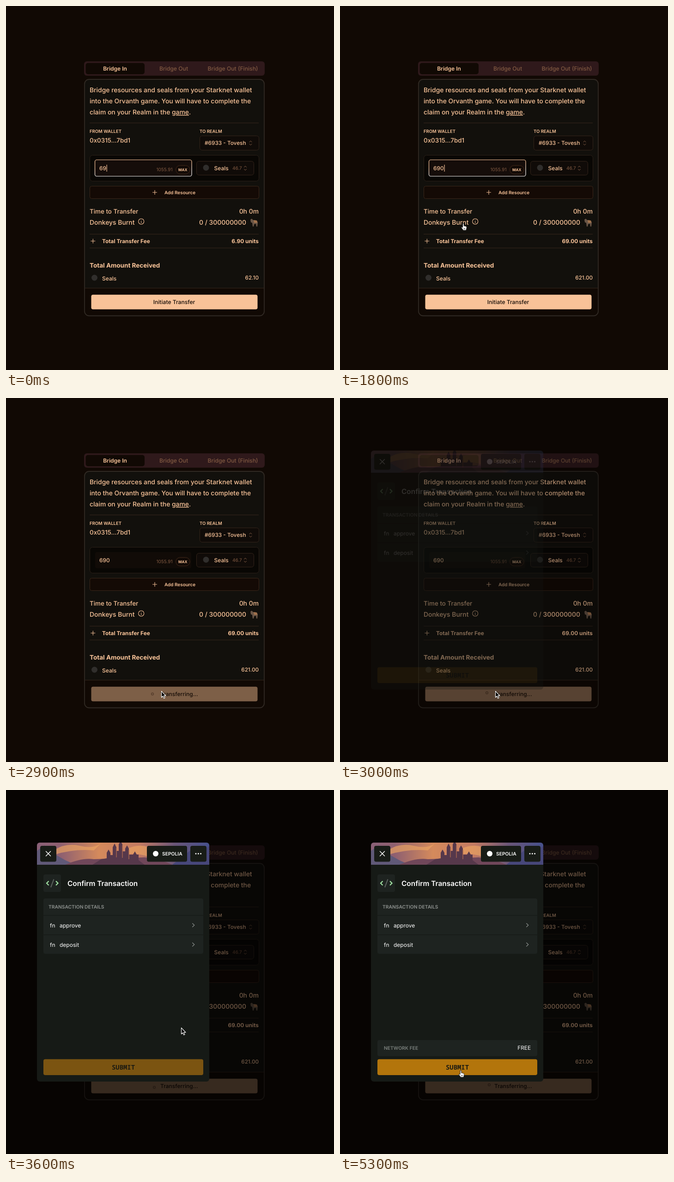
An HTML page for the animation above (5400 ms loop, 710 px wide and 789 px high).

```html
<!DOCTYPE html>
<html lang="en">
<head>
<meta charset="utf-8">
<title>Bridge transfer</title>
<style>
  html, body { margin: 0; width: 100%; height: 100%; overflow: hidden; background: #110904; }
  svg { display: block; width: 710px; height: 789px; font-family: Inter, sans-serif; text-rendering: geometricPrecision; }
  text { white-space: pre; }
  .peach { fill: #fbc59a; }
  .mute { fill: #825a42; }
  .line { stroke: #35251b; fill: none; }
  .box { stroke: #33241a; fill: #100b08; }
  .ico { fill: none; stroke: #f8c298; stroke-width: 1.1; stroke-linecap: round; }
  .arrows { fill: none; stroke: #8a6249; stroke-linecap: round; stroke-linejoin: round; }
  .m { font-weight: 500; }
  .s { font-weight: 600; }
  .b { font-weight: 700; }
  .end { text-anchor: end; }
  .mid { text-anchor: middle; }
  .tile { fill: #181c17; }
  .row { fill: #1e2320; }
</style>
</head>
<body>
<svg viewBox="0 0 710 789">
  <defs>
    <linearGradient id="ring" x1="0" y1="0" x2=".3" y2="1">
      <stop offset=".4" stop-color="#f8c298"/><stop offset=".9" stop-color="#f3f1ef"/>
    </linearGradient>
    <linearGradient id="sky">
      <stop offset="0" stop-color="#8a6077"/><stop offset=".14" stop-color="#8f6070"/>
      <stop offset=".36" stop-color="#d58a5c"/><stop offset=".6" stop-color="#c27a63"/>
      <stop offset=".8" stop-color="#695578"/><stop offset="1" stop-color="#46508c"/>
    </linearGradient>
    <clipPath id="banner"><path d="M67 162V120a6 6 0 0 1 6-6H434a6 6 0 0 1 6 6V162Z"/></clipPath>
    <path id="updown" class="arrows" d="M-2.6-2 0-4.6 2.6-2M-2.6 2 0 4.6 2.6 2"/>
    <path id="plus" class="ico" d="M-4.5 0H4.5M0-4.5V4.5"/>
    <path id="next" d="M-2-3.8 2 0-2 3.8" fill="none" stroke="#8d918e" stroke-width="1.2" stroke-linecap="round"/>
    <circle id="token" r="6.500" fill="#302e2c"/>
  </defs>

  <rect width="710" height="789" fill="#110904"/>

  <g class="m mid" font-size="12.2">
    <rect x="169" y="120" width="391" height="31" rx="6" fill="#2f191b"/>
    <rect x="172.500" y="123.500" width="127.500" height="24.500" rx="5" fill="#110904"/>
    <text class="peach s" x="236" y="140" font-size="12">Bridge In</text>
    <text class="mute" x="363" y="140">Bridge Out</text>
    <text class="mute" x="491" y="140">Bridge Out (Finish)</text>
  </g>

  <rect x="170" y="159" width="389" height="512.500" rx="10" fill="#12100c"/>
  <path d="M170 611.500H559V661.500a10 10 0 0 1-10 10H180a10 10 0 0 1-10-10Z" fill="#110904"/>
  <rect x="170" y="159" width="389" height="512.500" rx="10" fill="none" stroke="#312a24" stroke-width="1.8"/>
  <path class="line" d="M181 253.500H547M181 494.500H547M181 524.500H547M171 611.500H558"/>

  <g class="peach m" font-size="13.9">
    <text x="181" y="186.500">Bridge resources and seals from your Starknet wallet</text>
    <text x="181" y="210.700">into the Orvanth game. You will have to complete the</text>
    <text x="181" y="235">claim on your Realm in the <tspan text-decoration="underline">game</tspan>.</text>
    <text x="181" y="296" font-size="13.4">0x0315...7bd1</text>
    <text x="181" y="450" font-size="13.4">Time to Transfer</text>
    <text x="181" y="474">Donkeys Burnt</text>
    <text class="end" x="547" y="450">0h 0m</text>
    <text class="end" x="520" y="474">0 / 300000000</text>
  </g>
  <g class="peach s" font-size="9.5">
    <text x="181" y="274.500">FROM WALLET</text>
    <text x="419" y="274.500">TO REALM</text>
  </g>

  <rect class="box" x="419.500" y="281.500" width="128" height="31" rx="5"/>
  <text class="peach m" x="430" y="301" font-size="11.8">#6933 - Tovesh</text>
  <use href="#updown" x="529.500" y="297"/>

  <rect x="181.500" y="323.500" width="366" height="56" rx="6" fill="#090704" stroke="#2b2018"/>
  <rect x="193" y="334" width="208" height="35" rx="4" fill="#110b07"/>
  <g id="focus">
    <rect x="192.500" y="333.500" width="209.500" height="35.500" rx="4" fill="#150d0a" stroke="url(#ring)" stroke-width="1.2"/>
  </g>
  <rect id="caret" x="217.500" y="344" width="1.200" height="15" fill="#f8c298"/>
  <text class="mute" x="360.500" y="358.300" font-size="10" text-anchor="end">1055.91</text>
  <rect x="367.500" y="345.500" width="30.500" height="18.500" rx="9.250" fill="#120a06" stroke="#43291a"/>
  <text class="peach b mid" x="382.700" y="357.500" font-size="8.1">MAX</text>
  <rect class="box" x="412.500" y="336.500" width="124" height="30" rx="5"/>
  <use href="#token" x="433" y="350.500"/>
  <text class="peach m" x="450.500" y="355.700" font-size="12">Seals</text>
  <text class="mute" x="490" y="355" font-size="10">46.7</text>
  <use href="#updown" x="518" y="351.500"/>

  <rect x="181.500" y="390.500" width="366" height="27" rx="4" fill="#140a05" stroke="#3b271a"/>
  <use href="#plus" x="322" y="404"/>
  <text class="peach s" x="343" y="407.700" font-size="9.95">Add Resource</text>

  <g class="ico"><circle cx="292.700" cy="467" r="6"/><path d="M292.700 466.500V470M292.700 464V464.100"/></g>
  <path d="M529 463 532 461 535 464 543 465 545 469 544 478H542L541 472 537 473 536 478H534L533 470 530 469Z" fill="#6a5647"/>
  <path d="M536 464 543 465 544 470 537 470Z" fill="#a0714c"/>

  <use href="#plus" x="188.300" y="509.500"/>
  <text class="peach b" x="208" y="514" font-size="11.8">Total Transfer Fee</text>
  <text class="peach b" x="181" y="567" font-size="13.5">Total Amount Received</text>
  <use href="#token" x="191.500" y="589"/>
  <text class="peach m" x="208" y="595" font-size="12">Seals</text>

  <g id="before" class="peach m" font-size="11.9">
    <text x="202" y="356">69</text>
    <text class="end b" x="547" y="514">6.90 units</text>
    <text class="end" x="547" y="593" font-size="11.7">62.10</text>
  </g>
  <g id="after" class="peach m" font-size="11.9">
    <text x="202" y="356">690</text>
    <text class="end b" x="547" y="514">69.00 units</text>
    <text class="end" x="547" y="593" font-size="11.7">621.00</text>
  </g>

  <rect id="button" x="184.500" y="625.700" width="360" height="31.700" rx="4" fill="#f8c298"/>
  <text id="idle" class="m mid" x="364" y="646" font-size="12.1" fill="#150c06">Initiate Transfer</text>
  <g id="busy">
    <text class="m" x="334" y="646" font-size="12" fill="#150c06">Transferring...</text>
    <circle id="spinner" r="2.400" fill="none" stroke="#4f3828" stroke-width="1.300"/>
  </g>

  <rect id="shade" width="710" height="789" fill="#000"/>

  <rect id="panel" x="67" y="114" width="373" height="518" rx="6" fill="#161a16"/>
  <g id="modal">
    <g clip-path="url(#banner)">
      <rect x="67" y="114" width="373" height="48" fill="url(#sky)"/>
      <path d="M105 130Q130 114 160 121T205 116L190 131Q150 127 105 140ZM262 128Q285 116 310 124V145Q280 135 262 140Z" fill="#eda562" opacity=".65"/>
      <path d="M67 132 83 120 100 136 128 152 150 162H67Z" fill="#605978"/>
      <path d="M360 162 390 138 408 124 425 133 440 121V162Z" fill="#47477a"/>
      <path d="M128 162Q165 146 190 150L300 146Q335 150 360 162Z" fill="#70475a"/>
      <path d="M187 162 206 150 218 148V136L222 129 226 136V141H231V124L235 116 239 124V132H244V118L248 110 252 118V133H258V127L262 120 266 127V140H275L279 133 283 140H287V152L300 162Z" fill="#56384b"/>
      <path d="M252 120V147M266 130V150M239 126V146" stroke="#a5644f" stroke-width="1.500"/>
    </g>
    <rect class="tile" x="74" y="121" width="35" height="34.500" rx="4"/>
    <rect class="tile" x="305" y="121" width="87" height="34.500" rx="4"/>
    <rect class="tile" x="399" y="121" width="35" height="34.500" rx="4"/>
    <path d="M86.500 133 96.500 143M96.500 133 86.500 143" stroke="#fff" stroke-width="1.500" stroke-linecap="round"/>
    <g fill="#fff">
      <circle cx="324" cy="138" r="6"/>
      <circle cx="411" cy="138" r="1.500"/><circle cx="416.300" cy="138" r="1.500"/><circle cx="421.600" cy="138" r="1.500"/>
      <text class="s" x="338" y="141.800" font-size="10.3">SEPOLIA</text>
      <text class="s" x="133" y="208" font-size="15.4">Confirm Transaction</text>
    </g>
    <rect class="row" x="81" y="183" width="38" height="38" rx="4"/>
    <g fill="none" stroke-width="2.200">
      <path d="M92.500 197.500 88 202 92.500 206.500M108 197.500 112.500 202 108 206.500" stroke="#a2e5a4"/>
      <path d="M103.500 193.500 97 211" stroke="#585d5a"/>
    </g>
    <path class="row" d="M81 271V239a4 4 0 0 1 4-4H423a4 4 0 0 1 4 4V271ZM81 272.300H427V313.300H81ZM81 314.600H427V351a4 4 0 0 1-4 4H85a4 4 0 0 1-4-4Z"/>
    <text class="s" x="92" y="256.500" font-size="10.3" fill="#8f9390">TRANSACTION DETAILS</text>
    <g fill="#fff" font-size="12">
      <text x="95" y="297.500">fn</text><text x="116" y="297.500">approve</text>
      <text x="95" y="340">fn</text><text x="116" y="340">deposit</text>
    </g>
    <use href="#next" x="405.700" y="293"/>
    <use href="#next" x="405.700" y="335"/>
    <g id="fee">
      <rect class="row" x="81" y="542" width="346" height="35" rx="4"/>
      <text class="s" x="95" y="563" font-size="10.3" fill="#7b807d">NETWORK FEE</text>
      <text class="end" x="413" y="563" font-size="11.8" fill="#fff">FREE</text>
    </g>
    <rect id="submit" x="81" y="583.500" width="346" height="34.500" rx="4" fill="#7b5411"/>
    <text class="s mid" x="254" y="606" font-size="13.9" fill="#1b1a12" font-family="Noto Sans Mono, DejaVu Sans Mono, monospace">SUBMIT</text>
  </g>

  <g id="cursor">
    <path id="arrow" d="M.500.500V14L3.600 11.200 5.800 16 8 15 5.900 10.400H10Z" fill="#0a0a0a" stroke="#fff" stroke-width="1.100" stroke-linejoin="round"/>
    <path id="hand" d="M3.600 9V2a1.300 1.300 0 0 1 2.600 0V6.200Q7.500 5.500 8.400 6.700 9.800 6 10.500 7.300 12.300 7 12.300 8.800 12.300 12 10.800 15.800H4.700Q3.800 13.500.900 10.300.300 8.600 1.800 8.500 2.700 8.600 3.600 9.700ZM6.300 11V13.500M8.300 11V13.500" fill="#fff" stroke="#151515" stroke-linejoin="round"/>
  </g>
</svg>
<script>
const LOOP = 5400;

// Each step is [start ms, value]; values hold until the next step.
function play(id, prop, steps) {
  const frames = steps.map(([t, value]) => ({ offset: t / LOOP, [prop]: value, easing: 'step-end' }));
  frames.push({ offset: 1, [prop]: steps[steps.length - 1][1] });
  document.getElementById(id).animate(frames, { duration: LOOP, iterations: Infinity });
}
const fade = (id, ...steps) => play(id, 'opacity', [[0, 0], ...steps]);
const hide = (id, t) => play(id, 'opacity', [[0, 1], [t, 0]]);
const tint = (id, ...steps) => play(id, 'fill', steps);
const move = (id, ...steps) =>
  play(id, 'transform', steps.map(([t, x, y]) => [t, `translate(${x}px, ${y}px)`]));

// Typing
hide('before', 1300);
fade('after', [1300, 1]);
play('caret', 'opacity', [[0, 1], [400, 0], [900, 1], [1900, 0], [2400, 1], [2500, 0]]);
move('caret', [0, 0, 0], [1300, 8, 0]);
hide('focus', 2500);

// Transfer button
tint('button', [0, '#f8c298'], [2200, '#eab68e'], [2300, '#e0ae87'], [2500, '#ad8568'], [2600, '#7d5f47']);
hide('idle', 2500);
fade('busy', [2500, 1]);
move('spinner', [0, 316, 644], [2700, 316, 643], [2900, 317, 641.5], [3000, 318, 639], [3100, 319, 638.5],
  [3300, 322, 640], [3500, 322, 643], [3600, 321, 644.5], [4000, 320, 642], [4200, 322, 640], [4300, 323, 639]);

// Confirmation window
fade('shade', [3000, .3], [3100, .56]);
fade('panel', [3000, .3], [3100, .92], [3200, 1]);
fade('modal', [3000, .15], [3100, .6], [3200, .88], [3300, 1]);
fade('fee', [4900, .35], [5000, .8], [5100, 1]);
tint('submit', [0, '#7b5411'], [4900, '#8b5f10'], [5000, '#a26a0e'], [5100, '#b3750c']);

// Pointer
fade('cursor', [1800, 1]);
move('cursor', [0, 262, 470.5], [1900, 310, 670], [2200, 316, 655], [2300, 326, 642], [2400, 331, 636],
  [2700, 336, 635], [3400, 345, 610], [3500, 366, 550], [3600, 379, 515], [3700, 383, 509], [3800, 384, 512],
  [3900, 376, 523], [4000, 349, 545], [4100, 310, 567], [4200, 281, 579], [4300, 269, 582],
  [4500, 263, 594], [4600, 260, 602], [4900, 256.5, 607]);
const pointing = [[0, 1], [1900, 0], [2200, 1], [2600, 0], [4900, 1]];
play('hand', 'opacity', pointing);
play('arrow', 'opacity', pointing.map(([t, on]) => [t, 1 - on]));
</script>
</body>
</html>
```
